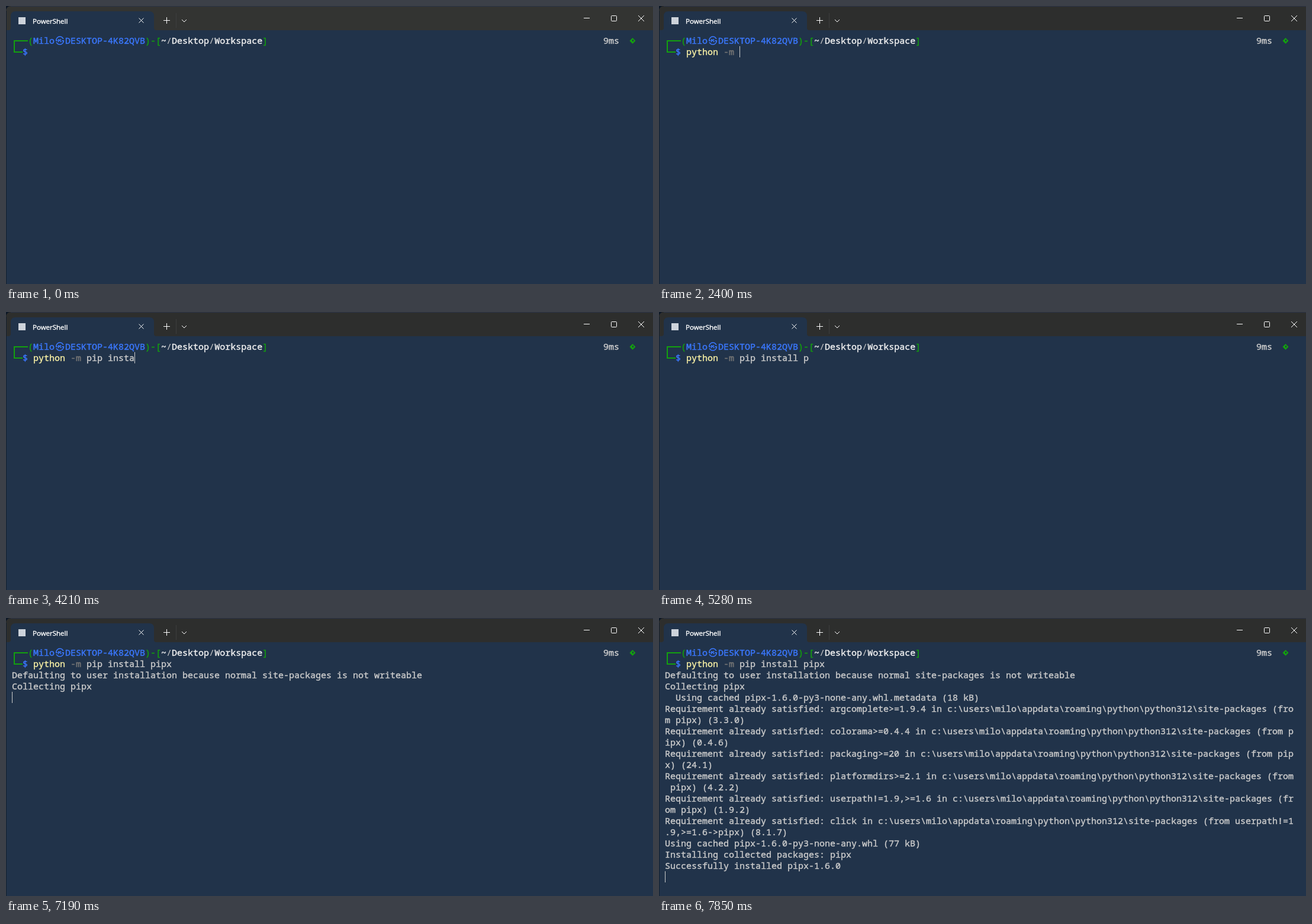
An HTML page for the animation above (8000 ms loop, 1093x471 px).

```html
<!DOCTYPE html>
<html lang="en">
<head>
<meta charset="utf-8">
<title>Terminal</title>
<style>
  html, body { margin: 0; width: 100%; height: 100%; overflow: hidden; background: #21334a; }
  svg, .row, #cursor, #title { position: absolute; }
  svg { left: 0; top: 0; }
  #title { left: 45px; top: 16px; font: 11.5px/20px "Open Sans", sans-serif; color: #fff;
    -webkit-text-stroke: .4px; }
  .row { left: 10px; height: 19px; white-space: pre; color: #ccc;
    font: 15px/19px "Noto Sans Mono", monospace; font-variant-ligatures: none;
    -webkit-text-stroke: .4px; }
  .green { color: #13a10e; }
  .blue { color: #3b78ff; }
  .path { color: #f2f2f2; }
  .path i { color: #ccc; font-style: normal; -webkit-text-stroke: 0; }
  .cmd { color: #f9f1a5; }
  .flag { color: #767676; }
  .wide { display: inline-block; width: 18px; line-height: 0; text-align: center;
    font-family: "Noto Sans CJK KR", "Noto Sans CJK JP", "Noto Sans CJK", sans-serif;
    -webkit-text-stroke: 0; }
  #cursor { width: 1px; height: 19px; background: #ccc; }
</style>
</head>
<body>
<svg width="1093" height="471" fill="none" stroke="#fff">
  <g stroke="none">
    <path id="bar" d="M0 0H1093V41H0Z"/>
    <path d="M0 0H8A8 8 0 0 0 0 8Z" fill="#0c1726"/>
    <path d="M0 8H1V471H0Z" fill="#14202f"/>
    <path d="M8 0H1093V1H8Z" fill="#2b3447"/>
    <path d="M4 41Q8 41 8 37V17Q8 9 16 9H242Q250 9 250 17V37Q250 41 254 41Z" fill="#21334a"/>
    <rect x="21" y="19" width="12" height="12" fill="#cdd3db"/>
    <path d="M1058.500 54L1063.500 59L1058.500 64L1053.500 59Z" fill="#13a10e"/>
    <path d="M1058 57H1060V60H1058Z" fill="#21334a"/>
  </g>
  <path d="M287.500 12V37" stroke="#3d3e3e"/>
  <path d="M224.500 20.500L232.500 28.500M232.500 20.500L224.500 28.500M266 24.500H277M271.500 19V30M297 23L301 27L305 23M1068 16L1078 26M1078 16L1068 26"/>
  <path d="M976 20.500H986"/>
  <rect x="1022.500" y="16.500" width="9" height="9" rx="1"/>
  <path d="M37 59H14V78H28" stroke="#13a10e" stroke-width="2"/>
</svg>
<div id="title">PowerShell</div>
<div id="cursor"></div>
<script>
const $ = id => document.getElementById(id);
const span = (cls, text) => `<span class="${cls}">${text}</span>`;
const COLS = 118, CELL = 9, LINE = 19, LEFT = 10, TOP = 49, LOOP = 8000;

const command = "python -m pip install pipx";
const keyTimes = [270, 470, 540, 670, 810, 1010, 1270, 1600, 2200, 2400, 2600, 2740, 2940,
  3080, 3480, 3670, 3810, 4010, 4210, 4280, 4470, 4610, 4750, 5550, 5750, 5950];
const enterTime = 6010;
const hidden = [[0, 270], [5280, 5550], [6660, 7190]];

// [time, number of output rows shown from then on]
const stages = [[6600, 1], [7190, 2], [7260, 15], [7330, 16], [7660, 17], [7850, 18]];

const need = (spec, version, by = "pipx") => `Requirement already satisfied: ${spec} in ` +
  `c:\\users\\milo\\appdata\\roaming\\python\\python312\\site-packages (from ${by}) (${version})`;
const output = [
  "Defaulting to user installation because normal site-packages is not writeable",
  "Collecting pipx",
  "  Using cached pipx-1.6.0-py3-none-any.whl.metadata (18 kB)",
  need("argcomplete>=1.9.4", "3.3.0"),
  need("colorama>=0.4.4", "0.4.6"),
  need("packaging>=20", "24.1"),
  need("platformdirs>=2.1", "4.2.2"),
  need("userpath!=1.9,>=1.6", "1.9.2"),
  need("click", "8.1.7", "userpath!=1.9,>=1.6->pipx"),
  "Using cached pipx-1.6.0-py3-none-any.whl (77 kB)",
  "Installing collected packages: pipx",
  "Successfully installed pipx-1.6.0"
].flatMap(line => line.match(new RegExp(`.{1,${COLS}}`, "g")));

function addRow(row, col = 0) {
  const el = document.createElement("div");
  el.className = "row";
  el.style.top = TOP + LINE * row + "px";
  el.style.left = LEFT + CELL * col + "px";
  return document.body.appendChild(el);
}

addRow(0, 3).innerHTML = span("green", "(") +
  span("blue", `Milo${span("wide", "㉿")}DESKTOP-4K82QVB`) + span("green", ")-[") +
  span("path", "~<i>/</i>Desktop<i>/</i>Workspace") + span("green", "]");
addRow(0, 111).textContent = "9ms";
addRow(1, 2).innerHTML = span("blue", "$");
const input = addRow(1, 4);
const rows = output.map((text, i) => {
  const el = addRow(i + 2);
  el.textContent = text;
  return el;
});

function draw(t) {
  const typed = keyTimes.filter(k => k <= t).length;
  const shown = stages.reduce((n, [start, count]) => t >= start ? count : n, 0);
  const text = command.slice(0, typed);
  input.innerHTML = span("cmd", text.slice(0, 6)) + text.slice(6, 7) +
    span(typed > 8 ? "flag" : "", text.slice(7, 9)) + text.slice(9);
  rows.forEach((el, i) => el.style.visibility = i < shown ? "visible" : "hidden");

  const [col, row] = t < enterTime ? [4 + typed, 1] : [0, 2 + shown];
  const { style } = $("cursor");
  style.left = LEFT + CELL * col + "px";
  style.top = TOP + LINE * row + "px";
  style.visibility = hidden.some(([a, b]) => t >= a && t < b) ? "hidden" : "visible";
  $("bar").setAttribute("fill", t < 70 ? "#333432" : "#2d2e2d");
}

const start = performance.now();
function tick() {
  draw((performance.now() - start) % LOOP);
  requestAnimationFrame(tick);
}
tick();
</script>
</body>
</html>
```
